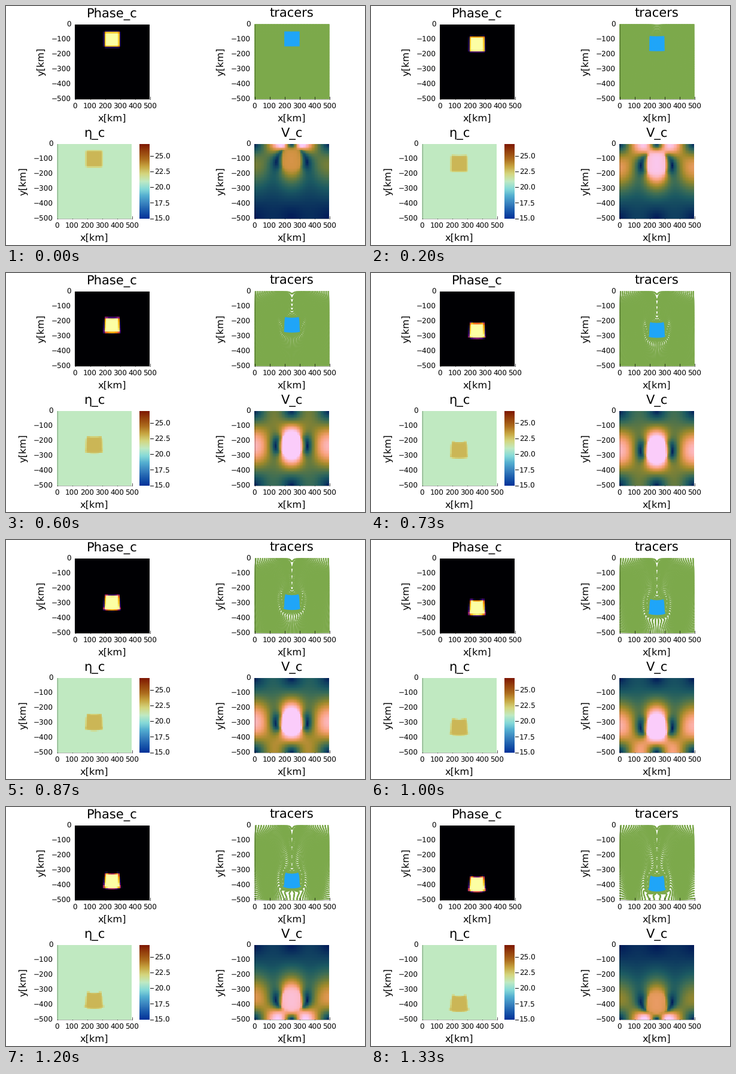
Animation, 600 px wide and 400 px high, one loop 1.4 s. Source, as a matplotlib script:

```python
import numpy as np
import matplotlib.pyplot as plt
from matplotlib.animation import FuncAnimation
from matplotlib.colors import LinearSegmentedColormap
from matplotlib.patches import Rectangle

TICK_MS, TICKS = 20, 70             # one loop is 1400 ms
FPS, STATES = 15, 21                # the picture changes 15 times a second
SIZE, CELL, N = 500.0, 10.0, 50     # box in km, cell in km, cells per side
HALF = N // 2                       # the flow is symmetric about x = 250
GREEN, BLUE = "#7ca94b", "#1fa5f8"

plt.rcParams["font.family"] = "DejaVu Sans"
plt.rcParams["text.hinting"] = "none"


def colormap(name, rgb):
    return LinearSegmentedColormap.from_list(name, np.array(rgb) / 255)


BATLOW = colormap("batlow", [
    (1, 25, 89), (16, 63, 96), (28, 90, 98), (60, 109, 86), (104, 123, 62),
    (157, 137, 43), (210, 147, 67), (248, 161, 123), (253, 183, 188),
    (250, 204, 250)])
ROMA = colormap("roma", [
    (3, 49, 152), (26, 88, 171), (55, 128, 190), (82, 172, 208),
    (133, 217, 216), (192, 234, 195), (212, 214, 127), (199, 166, 66),
    (172, 107, 29), (150, 67, 14), (126, 23, 0)])


# ---------- Stokes flow, stream function on the left half of the box ----------

ids = np.arange((N + 1) * (HALF + 1)).reshape(N + 1, HALF + 1)
inner = ids[1:-1, 1:-1].ravel()


def stencil(parts, signs):
    """Flat matrix positions and weights of the outer product of a stencil."""
    nodes = np.stack([p.ravel() for p in parts], -1)
    flat = nodes[:, :, None] * ids.size + nodes[:, None, :]
    return flat.ravel(), np.outer(signs, signs)


CROSS, CROSS_W = stencil(
    [ids[1:-1, :-2], ids[1:-1, 2:], ids[:-2, 1:-1], ids[2:, 1:-1]],
    [1, 1, -1, -1])
CORNER, CORNER_W = stencil(
    [ids[:-1, :-1], ids[:-1, 1:], ids[1:, :-1], ids[1:, 1:]],
    [2, -2, -2, 2])
POSITIONS = np.concatenate([CROSS, CORNER])


def deposit(x, y, value, offset, n):
    """Bilinear average of marker values on an n by n grid."""
    gx, gy = x / CELL - offset, y / CELL - offset
    i, j = np.floor(gx).astype(int), np.floor(gy).astype(int)
    fx, fy = gx - i, gy - j
    m = n + 2
    total, weight = np.zeros(m * m), np.zeros(m * m)
    for di, wx in ((1, 1 - fx), (2, fx)):
        for dj, wy in ((1, 1 - fy), (2, fy)):
            at = np.minimum(j + dj, m - 1) * m + np.minimum(i + di, m - 1)
            total += np.bincount(at, wx * wy * value, m * m)
            weight += np.bincount(at, wx * wy, m * m)
    grid = total / np.maximum(weight, 1e-9)
    return grid.reshape(m, m)[1:-1, 1:-1]


def sample(grid, gx, gy):
    i = np.clip(gx.astype(int), 0, grid.shape[1] - 2)
    j = np.clip(gy.astype(int), 0, grid.shape[0] - 2)
    fx, fy = gx - i, gy - j
    return ((1 - fy) * ((1 - fx) * grid[j, i] + fx * grid[j, i + 1])
            + fy * ((1 - fx) * grid[j + 1, i] + fx * grid[j + 1, i + 1]))


def viscosity(phase):
    return 1 + 99 * phase           # in units of 1e21 Pa s


def solve(cells, nodes):
    """Velocities on the cell faces, up to a factor."""
    eta_n = viscosity(nodes[1:-1, 1:HALF]).ravel()
    eta_c = viscosity(cells[:, :HALF]).ravel()
    weights = np.concatenate([
        (eta_n[:, None, None] * CROSS_W).ravel(),
        (eta_c[:, None, None] * CORNER_W).ravel()])
    matrix = np.bincount(POSITIONS, weights, ids.size ** 2)
    matrix = matrix.reshape(ids.size, ids.size)[np.ix_(inner, inner)]
    slope = np.diff(cells[:, :HALF], axis=1)
    force = slope[1:] + slope[:-1]
    psi = np.zeros(ids.size)
    psi[inner] = np.linalg.solve(matrix, force.ravel())
    psi = psi.reshape(ids.shape)
    return np.diff(psi, axis=0), -np.diff(psi, axis=1)


def velocity(vx, vy, x, y):
    u = sample(np.pad(vx, ((1, 1), (0, 0)), "edge"), x / CELL, y / CELL + 0.5)
    v = sample(np.pad(vy, ((0, 0), (1, 1)), "edge"), x / CELL + 0.5, y / CELL)
    return u, v


def sink_speed(depth):
    """Fall of the block in km per picture."""
    return 17.5 * (1 - (abs(depth - 250) / 186) ** 3)


def shown_speed(depth):
    """Speed of the block as a share of the colour scale."""
    return 1.12 * (1 - (abs(depth - 250) / 184) ** 4.4)


def mirrored(x, y):
    return np.concatenate([x, SIZE - x]), np.concatenate([y, y])


def simulate():
    """Phase, log viscosity, speed and marker positions for every picture."""
    x, y = np.meshgrid(np.arange(2.5, 250, 5), np.arange(2.5, 500, 5))
    x, y = x.ravel(), y.ravel()
    block = (x > 200) & (y > 50) & (y < 150)
    value = np.tile(block, 2).astype(float)
    states = []
    for step in range(2 * STATES - 1):
        mx, my = mirrored(x, y)
        cells = deposit(mx, my, value, 0.5, N)
        nodes = deposit(mx, my, value, 0, N + 1)
        vx, vy = solve(cells, nodes)
        mean = velocity(vx, vy, x[block], y[block])[1].mean()
        vx, vy = vx / mean, vy / mean
        depth = y[block].mean()
        if step % 2 == 0:
            speed = np.hypot(vx[:, 1:] + vx[:, :-1], vy[1:] + vy[:-1]) / 2
            speed *= shown_speed(depth)
            states.append((cells, 21 + np.log10(viscosity(cells)),
                           np.hstack([speed, speed[:, ::-1]]), mx, my))
        # two midpoint substeps, each a quarter of a picture
        move = sink_speed(depth + sink_speed(depth) / 4) / 4
        for _ in range(2):
            u, v = velocity(vx, vy, x, y)
            u, v = velocity(vx, vy, np.clip(x + u * move / 2, 0.01, 249.99),
                            np.clip(y + v * move / 2, 0.01, 499.99))
            x = np.clip(x + u * move, 0.01, 249.99)
            y = np.clip(y + v * move, 0.01, 499.99)
    return states, value > 0.5


states, is_block = simulate()


# ---------- drawing, all in pixels of the stage ----------

SIDE = 125
fig = plt.figure(figsize=(6, 4), dpi=100, facecolor="white")
ax = fig.add_axes([0, 0, 1, 1])
ax.axis("off")


def label(x, y, text, px, ha="center", va="baseline", **kw):
    ax.text(x, y, text, fontsize=px * 0.72, ha=ha, va=va, color="black", **kw)


def line(xs, ys, alpha=1.0, zorder=1):
    ax.plot(xs, ys, color="black", lw=0.7, alpha=alpha, zorder=zorder)


def panel(x0, y0, title):
    bottom = y0 + SIDE
    line([x0 + 0.5, x0 + 0.5], [y0 + 0.5, bottom], 0.3, 3)
    line([x0, x0 + SIDE], [bottom, bottom], 0.3, 3)
    for k in range(6):
        d = 25 * k
        line([x0 + d + 0.5, x0 + d + 0.5], [bottom, bottom - 4], 0.7)
        label(x0 + d + 0.5, bottom + 16.4, str(100 * k), 12)
        text = f"\u2212{100 * k}" if k else "0"
        label(x0 - 6, y0 + d + 4.6, text, 12, ha="right")
    label(x0 + 62.7, y0 - 11.8, title, 21)
    label(x0 + 62.7, bottom + 37, "x[km]", 16.2)
    label(x0 - 56, y0 + 62.5, "y[km]", 16.2, va="center", rotation=90)


def image(data, cmap, low, high, x0, y0, width):
    return ax.imshow(data, cmap=cmap, vmin=low, vmax=high,
                     extent=(x0, x0 + width, y0 + SIDE + 0.5, y0 + 0.5),
                     aspect="auto", interpolation="nearest", zorder=2)


def heatmap(x0, y0, cmap, low, high):
    return image(np.zeros((N, N)), cmap, low, high, x0, y0, SIDE)


TOP, LOW = 30.5, 230.5
LEFT, ETA_X, RIGHT = 115, 85, 415
panel(LEFT, TOP, "Phase_c")
panel(RIGHT, TOP, "tracers")
panel(ETA_X, LOW, "\u03b7_c")
panel(RIGHT, LOW, "V_c")

phase_map = heatmap(LEFT, TOP, "inferno", 0, 1)
eta_map = heatmap(ETA_X, LOW, ROMA, 15, 27)
speed_map = heatmap(RIGHT, LOW, BATLOW, 0, 1)

tracers = ax.scatter(np.zeros(is_block.size), np.zeros(is_block.size),
                     s=(2.3 * 0.72) ** 2, marker=(8, 0), linewidths=0,
                     c=np.where(is_block, BLUE, GREEN), zorder=0.5)
window = Rectangle((RIGHT, TOP - 0.5), SIDE + 1, SIDE + 1,
                   transform=ax.transData)
tracers.set_clip_path(window)

image(np.linspace(27, 15, 256)[:, None], ROMA, 15, 27, 223, LOW, 17)
for tick in np.arange(15, 26, 2.5):
    ty = LOW + SIDE * (27 - tick) / 12
    line([240.5, 245.5], [ty, ty])
    label(248, ty + 4.6, f"{tick:.1f}", 12, ha="left")

ax.set_xlim(0, 600)
ax.set_ylim(400, 0)


def update(tick):
    now = tick * TICK_MS + 15       # changes fall on rounded times
    phase, eta, speed, mx, my = states[int(now * FPS / 1000)]
    phase_map.set_data(phase)
    eta_map.set_data(eta)
    speed_map.set_data(speed)
    tracers.set_offsets(np.column_stack([RIGHT + 0.4 + mx / 4, TOP + my / 4]))
    return phase_map, eta_map, speed_map, tracers


anim = FuncAnimation(fig, update, frames=TICKS, interval=TICK_MS,
                     init_func=lambda: update(0), repeat=True, repeat_delay=0)
plt.show()
```
